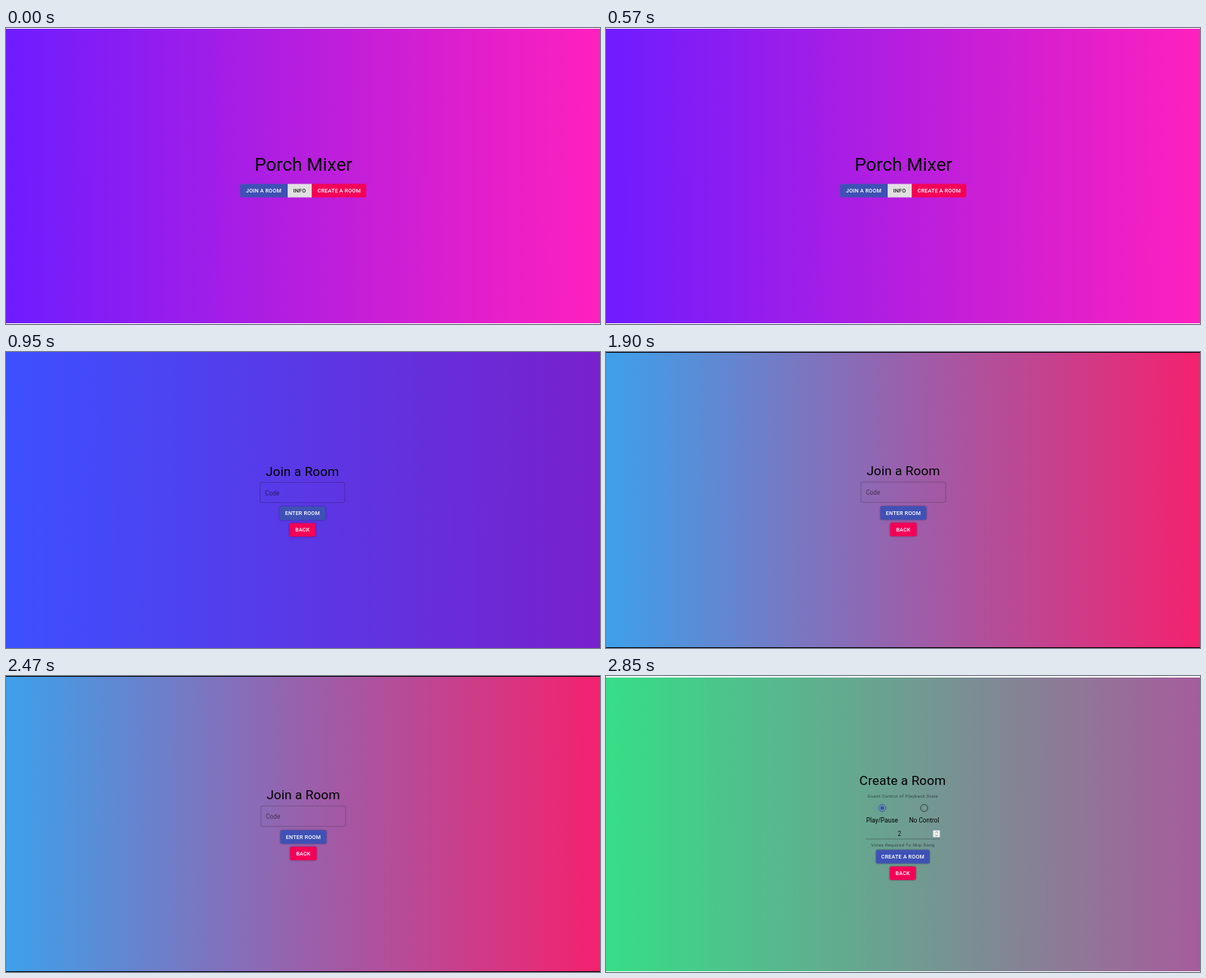
These frames come from a looping animation (789x394 px, 3800 ms). An HTML page:

```html
<!DOCTYPE html>
<html lang="en">
<head>
<meta charset="utf-8">
<title>Rooms</title>
<style>
  html, body { margin: 0; width: 100%; height: 100%; overflow: hidden; }
  body { position: relative; font-family: Roboto, sans-serif; }
  .scene {
    position: absolute; inset: 0; visibility: hidden;
    animation: show 3800ms step-end infinite;
  }
  .home { animation-delay: 0s; background: linear-gradient(90deg, #6e1cff, #ff20be); }
  .join-a { animation-delay: -2850ms; background: linear-gradient(90deg, #3c50ff, #7820cc); }
  .join-b { animation-delay: -1900ms; background: linear-gradient(90deg, #3ea0ea, #f4216e); }
  .create { animation-delay: -950ms; background: linear-gradient(90deg, #36de87, #a65c9b); }
  @keyframes show {
    0% { visibility: visible; }
    25%, 100% { visibility: hidden; }
  }
  svg { display: block; width: 789px; height: 394px; }
  text { text-anchor: middle; }
  .h3 { font-size: 24.4px; }
  .h4 { font-size: 17.2px; letter-spacing: .00735em; }
  .label { font-size: 8.2px; letter-spacing: .00938em; }
  .hint { font-size: 6.2px; letter-spacing: .0333em; fill: rgba(0, 0, 0, .54); }
  .btn { font-size: 7.15px; font-weight: 500; letter-spacing: .02857em; fill: #fff; }
  .blue { fill: #3f51b5; }
  .red { fill: #f50057; }
  .raised { filter: drop-shadow(0 .8px .8px rgba(0, 0, 0, .4)); }
</style>
</head>
<body>
<div class="scene home">
  <svg viewBox="0 0 789 394">
    <path d="M0 0H789V1H0zM0 393H789V394H0z" fill="#fff"/>
    <text class="h3" x="395" y="190">Porch Mixer</text>
    <path class="blue" d="M374 207.5V225.5H313a2 2 0 0 1-2-2V209.5a2 2 0 0 1 2-2z"/>
    <path fill="#e0e0e0" d="M374 207.5H406V225.5H374z"/>
    <path class="red" d="M406 207.5H476.5a2 2 0 0 1 2 2V223.5a2 2 0 0 1-2 2H406z"/>
    <path d="M373.7 207.5V225.5" stroke="#303f9f" stroke-width=".5"/>
    <g class="btn">
      <text x="342.3" y="219.1">JOIN A ROOM</text>
      <text x="390" y="219.1" style="fill: rgba(0, 0, 0, .87)">INFO</text>
      <text x="442.5" y="219.1">CREATE A ROOM</text>
    </g>
  </svg>
</div>

<div class="scene join-a">
  <svg viewBox="0 0 789 394">
    <defs>
      <g id="form">
        <text class="h4" x="393.7" y="164.5">Join a Room</text>
        <rect x="337.5" y="173.5" width="112.5" height="27" rx="2" fill="none" stroke="#000" stroke-opacity=".26" stroke-width=".8"/>
        <text class="label" x="344" y="190.6" style="text-anchor: start" fill-opacity=".54">Code</text>
        <g class="raised">
          <rect class="blue" x="363.3" y="205.7" width="61" height="18" rx="2"/>
          <rect class="red" x="376.2" y="227.7" width="35.2" height="18" rx="2"/>
        </g>
        <g class="btn">
          <text x="393.8" y="217.2">ENTER ROOM</text>
          <text x="393.8" y="239.2">BACK</text>
        </g>
      </g>
    </defs>
    <use href="#form"/>
  </svg>
</div>

<div class="scene join-b">
  <svg viewBox="0 0 789 394">
    <path d="M0 0H789V1H0zM0 393H789V394H0z"/>
    <use href="#form" x="1.2" y="-.4"/>
  </svg>
</div>

<div class="scene create">
  <svg viewBox="0 0 789 394">
    <path d="M0 0H789V2H0zM0 393H789V394H0z" fill="#fff"/>
    <text class="h4" x="394" y="145.2">Create a Room</text>
    <text class="hint" x="394.2" y="162.4">Guest Control of Playback State</text>
    <g fill="none" stroke-width="1">
      <circle cx="366.8" cy="175.7" r="4.7" stroke="#3f51b5"/>
      <circle cx="422.6" cy="175.7" r="4.7" stroke="#000" stroke-opacity=".6"/>
    </g>
    <circle class="blue" cx="366.8" cy="175.7" r="2.6"/>
    <g class="label">
      <text x="366.8" y="194.7">Play/Pause</text>
      <text x="422.6" y="194.7">No Control</text>
      <text x="389.8" y="213" fill-opacity=".87">2</text>
    </g>
    <rect x="434.5" y="205.5" width="9" height="9" fill="#efefef"/>
    <path d="M437.4 208.8l1.6-1.6 1.6 1.6M437.4 211.3l1.6 1.6 1.6-1.6" fill="none" stroke="#666" stroke-width=".7"/>
    <path d="M345.5 217H443.5" stroke="#000" stroke-opacity=".5" stroke-width=".8" stroke-dasharray="1.6 .8"/>
    <text class="hint" x="394.2" y="226.8">Votes Required To Skip Song</text>
    <g class="raised">
      <rect class="blue" x="358.7" y="231.6" width="71.2" height="18" rx="2"/>
      <rect class="red" x="376.8" y="253.5" width="34.8" height="18" rx="2"/>
    </g>
    <g class="btn">
      <text x="394.3" y="243.1">CREATE A ROOM</text>
      <text x="394.2" y="265">BACK</text>
    </g>
  </svg>
</div>
</body>
</html>
```
